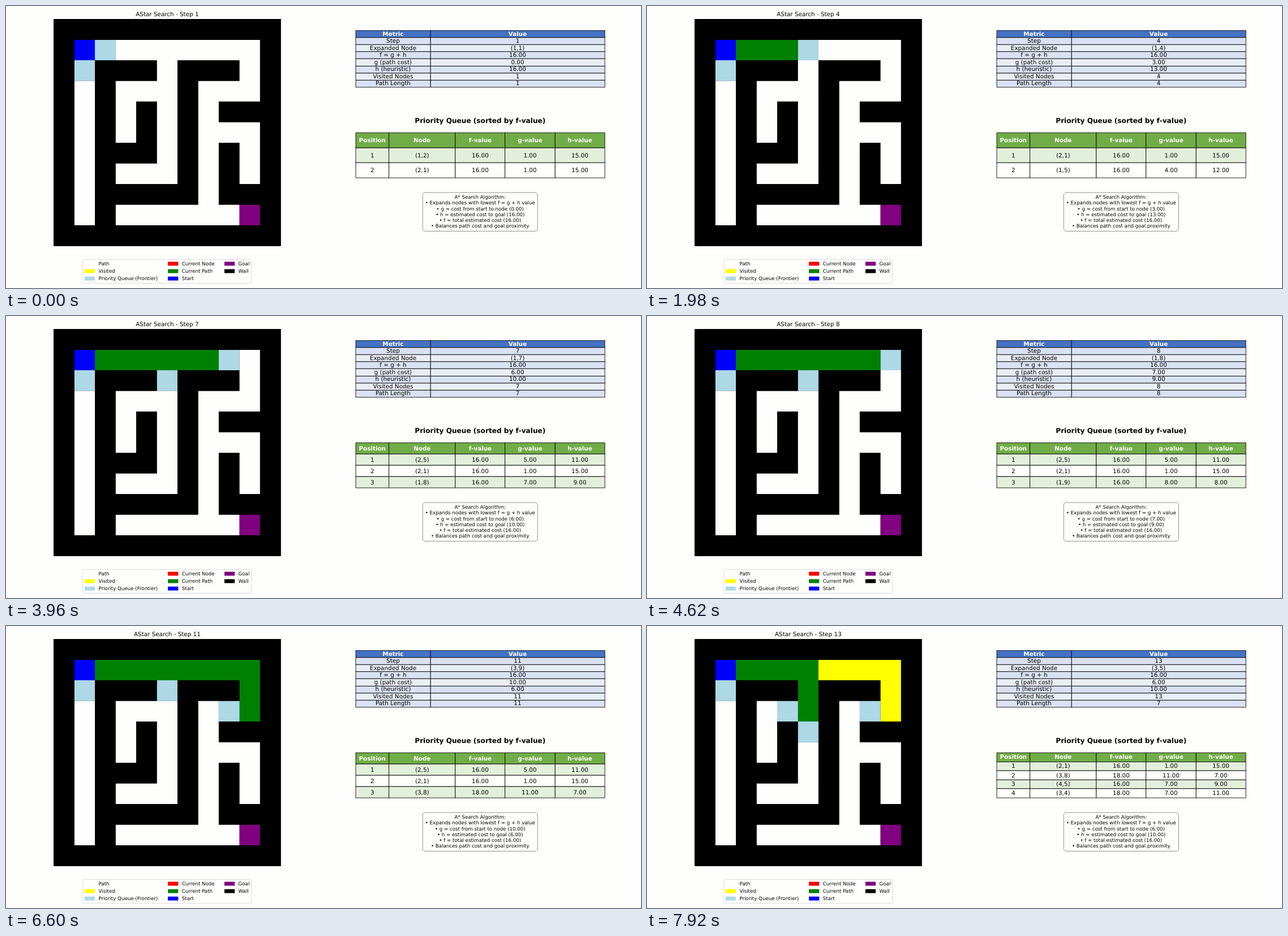
An HTML page with a canvas for the animation above (8000 ms loop, 1122 by 499 pixels).

```html
<!DOCTYPE html>
<html lang="en">
<head>
<meta charset="utf-8">
<title>AStar Search</title>
<style>
html, body { margin: 0; width: 100%; height: 100%; overflow: hidden; background: #fefefd; }
canvas { display: block; }
</style>
</head>
<body>
<canvas id="stage" width="1122" height="499"></canvas>
<script>
// Everything is laid out on an 1800 x 800 figure at 100 dpi, scaled to the stage
const WIDTH = 1800, HEIGHT = 800, PT = 100 / 72;
const LOOP = 8000, STEP = 660, PAPER = '#fefefd';
const MID_LEFT = 457, MID_RIGHT = 1344;
const ctx = document.getElementById('stage').getContext('2d');
ctx.scale(1122 / WIDTH, 499 / HEIGHT);
ctx.textRendering = 'geometricPrecision';

const MAZE = [
  '###########',
  '#.........#',
  '#.###.###.#',
  '#.#...#...#',
  '#.#.#.#.###',
  '#.#.#.#...#',
  '#.###.#.#.#',
  '#.#...#.#.#',
  '#.#####.###',
  '#.#.......#',
  '###########'
];

// A* search, recording what is known after each expansion
function search(steps) {
  const makeNode = (r, c, parent) => {
    const g = parent ? parent.g + 1 : 0, h = 18 - r - c;
    return { r, c, parent, g, h, f: g + h };
  };
  const seen = new Set(['1,1']), visited = [], history = [];
  let queue = [makeNode(1, 1)];
  while (history.length < steps) {
    queue.sort((a, b) => a.f - b.f || a.h - b.h);
    const node = queue.shift();
    visited.push(node);
    for (const [dr, dc] of [[0, 1], [1, 0], [0, -1], [-1, 0]]) {
      const r = node.r + dr, c = node.c + dc, key = r + ',' + c;
      if (MAZE[r][c] === '#' || seen.has(key)) continue;
      seen.add(key);
      queue.push(makeNode(r, c, node));
    }
    history.push({ node, queue: [...queue], visited: [...visited] });
  }
  return history;
}

const history = search(Math.ceil(LOOP / STEP));
const fixed = n => n.toFixed(2);
const place = n => `(${n.r},${n.c})`;

function text(str, x, y, pt = 12, { color = '#000', bold = false, align = 'center' } = {}) {
  ctx.font = `${bold ? 'bold ' : ''}${pt * PT}px "DejaVu Sans", sans-serif`;
  ctx.textAlign = align;
  ctx.fillStyle = color;
  ctx.fillText(str, x, Math.round(y));
}

function drawMaze({ node, queue, visited }) {
  const left = 135, top = 37, size = 644;
  const edge = k => Math.round(k * size / 11);
  const colors = MAZE.map(row => [...row].map(ch => ch === '#' ? '#000' : PAPER));
  const paint = (n, color) => { colors[n.r][n.c] = color; };
  visited.forEach(n => paint(n, '#ff0'));
  queue.forEach(n => paint(n, '#add8e6'));
  for (let n = node; n; n = n.parent) paint(n, '#008000');
  paint({ r: 1, c: 1 }, '#00f');
  paint({ r: 9, c: 9 }, '#800080');

  ctx.fillStyle = '#000';
  ctx.fillRect(left, top, size, size);
  // One path per colour keeps neighbouring cells free of seams
  for (const color of new Set(colors.flat())) {
    ctx.beginPath();
    colors.forEach((row, r) => row.forEach((value, c) => {
      if (value !== color) return;
      const x = edge(c), y = edge(r);
      ctx.rect(left + x, top + y, edge(c + 1) - x, edge(r + 1) - y);
    }));
    ctx.fillStyle = color;
    ctx.fill();
  }
}

// The first row is the header; the colours of the others alternate
function drawTable(top, height, shares, rows, colors) {
  const rowHeight = height / rows.length, snap = v => Math.floor(v) + 0.5;
  const total = shares.reduce((a, b) => a + b);
  const columns = [991.3];
  shares.forEach((share, j) => columns.push(columns[j] + 706 * share / total));
  ctx.strokeStyle = '#000';
  ctx.lineWidth = PT;
  rows.forEach((row, i) => row.forEach((value, j) => {
    const x = snap(columns[j]), y = snap(top + i * rowHeight);
    const box = [x, y, snap(columns[j + 1]) - x, snap(top + (i + 1) * rowHeight) - y];
    ctx.fillStyle = colors[i ? 2 - i % 2 : 0];
    ctx.fillRect(...box);
    ctx.strokeRect(...box);
  }));
  rows.forEach((row, i) => row.forEach((value, j) =>
    text(value, (columns[j] + columns[j + 1]) / 2, top + (i + 0.5) * rowHeight + 5, 12,
      i ? {} : { color: '#fff', bold: true })));
}

function roundBox(x, y, w, h, radius, stroke) {
  ctx.beginPath();
  ctx.roundRect(x, y, w, h, radius);
  ctx.strokeStyle = stroke;
  ctx.lineWidth = PT;
  ctx.stroke();
}

function drawLegend() {
  roundBox(218, 719, 477.5, 67.5, 2.8, '#d6d6d6');
  const columns = [
    [223.5, [['Path', PAPER], ['Visited', '#ff0'], ['Priority Queue (Frontier)', '#add8e6']]],
    [459.7, [['Current Node', '#f00'], ['Current Path', '#008000'], ['Start', '#00f']]],
    [619.8, [['Goal', '#800080'], ['Wall', '#000']]]
  ];
  for (const [x, items] of columns) {
    items.forEach(([label, color], i) => {
      const y = 736 + i * 21;
      ctx.fillStyle = color;
      ctx.fillRect(x - 0.7, y - 10.4, 29.2, 11.1);
      text(label, x + 38.9, y, 10, { align: 'left' });
    });
  }
}

function drawNotes({ f, g, h }) {
  roundBox(MID_RIGHT - 162.8, 529.2, 325.6, 109.6, 6.9, '#7f7f7f');
  [
    'A* Search Algorithm:',
    '• Expands nodes with lowest f = g + h value',
    `• g = cost from start to node (${fixed(g)})`,
    `• h = estimated cost to goal (${fixed(h)})`,
    `• f = total estimated cost (${fixed(f)})`,
    '• Balances path cost and goal proximity'
  ].forEach((line, i) => text(line, MID_RIGHT, 547 + i * 16.35, 10));
}

function draw(index) {
  const state = history[index], { node, queue, visited } = state;
  ctx.fillStyle = PAPER;
  ctx.fillRect(0, 0, WIDTH, HEIGHT);

  text(`AStar Search - Step ${index + 1}`, MID_LEFT, 29);
  drawMaze(state);
  drawLegend();

  drawTable(69.7, 160.5, [3, 7], [
    ['Metric', 'Value'],
    ['Step', index + 1],
    ['Expanded Node', place(node)],
    ['f = g + h', fixed(node.f)],
    ['g (path cost)', fixed(node.g)],
    ['h (heuristic)', fixed(node.h)],
    ['Visited Nodes', visited.length],
    ['Path Length', node.g + 1]
  ], ['#4472c4', '#d9e1f2', '#e9edf4']);

  text('Priority Queue (sorted by f-value)', MID_RIGHT, 332, 14, { bold: true });
  drawTable(359.5, 128, [2, 4, 3, 3, 3], [
    ['Position', 'Node', 'f-value', 'g-value', 'h-value'],
    ...queue.map((n, i) => [i + 1, place(n), fixed(n.f), fixed(n.g), fixed(n.h)])
  ], ['#70ad47', '#e2efda', PAPER]);
  drawNotes(node);
}

const begin = performance.now();
let shown = -1;
function tick() {
  const index = Math.floor((performance.now() - begin) % LOOP / STEP);
  if (index !== shown) draw(shown = index);
  requestAnimationFrame(tick);
}
tick();
</script>
</body>
</html>
```
